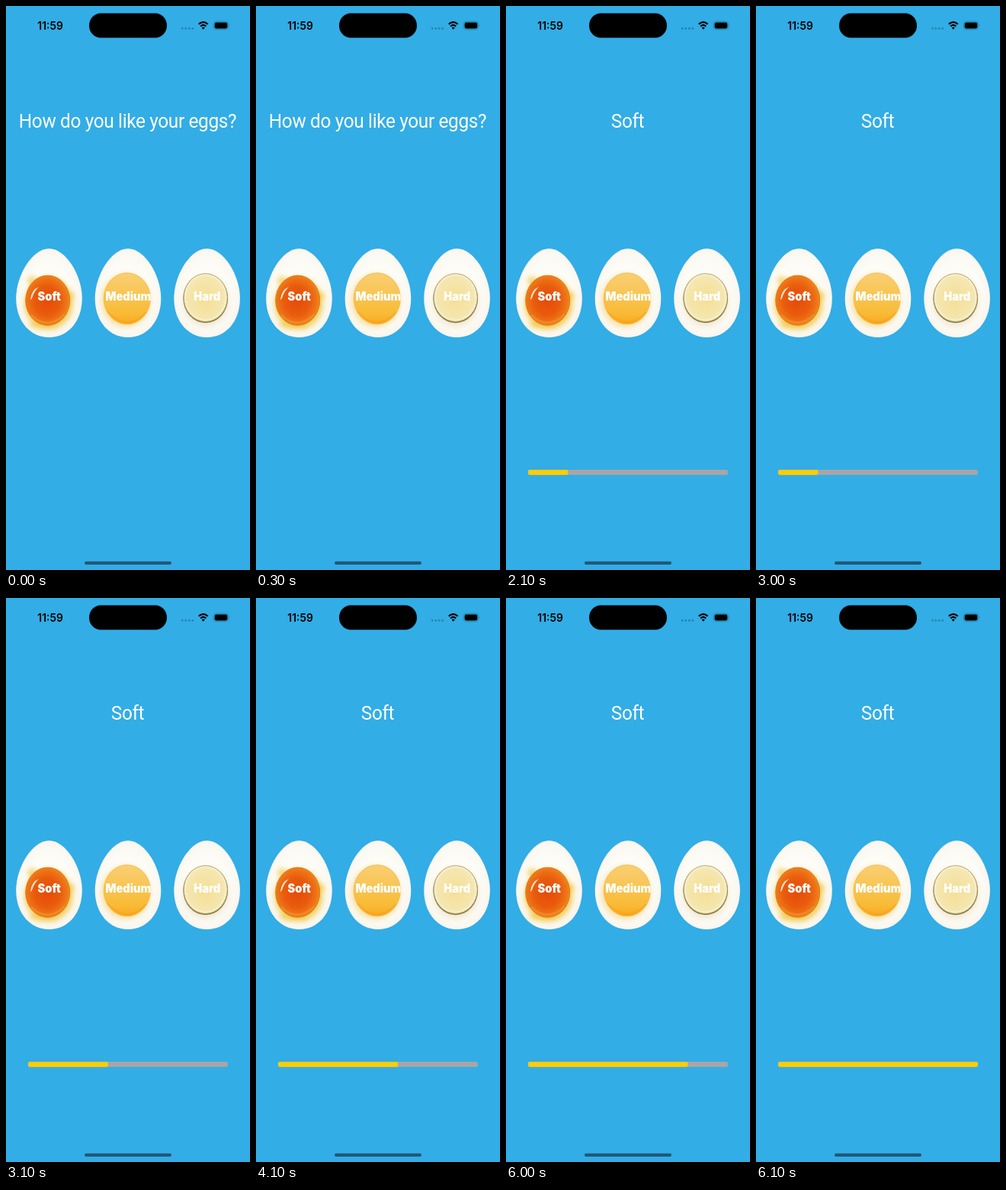
An HTML page that plays this animation: 320 by 737 pixels, repeating every 8 s.

```html
<!DOCTYPE html>
<html lang="en">
<head>
<meta charset="utf-8">
<title>Egg timer</title>
<style>
  html, body { margin: 0; width: 100%; height: 100%; overflow: hidden; background: #32ade6; }
  svg { display: block; width: 320px; height: 737px; }
  text { text-anchor: middle; fill: #fff; }
  #title { font: 30px Roboto, sans-serif; letter-spacing: -.45px; }
  .label { font: 900 18px Inter, sans-serif; letter-spacing: -.05px; }
  #clock { font: 600 17px Inter, sans-serif; fill: #000; }
</style>
</head>
<body>
<svg viewBox="0 0 320 737">
  <defs>
    <radialGradient id="white" cy=".5" r=".54">
      <stop offset=".6" stop-color="#fdfcf6"/>
      <stop offset=".85" stop-color="#faf8f1"/>
      <stop offset="1" stop-color="#f7f4ec"/>
    </radialGradient>
    <radialGradient id="soft" cx=".48" cy=".5" r=".53">
      <stop offset="0" stop-color="#e64a08"/>
      <stop offset=".55" stop-color="#e95b0d"/>
      <stop offset=".85" stop-color="#ee7517"/>
      <stop offset="1" stop-color="#f08c22"/>
    </radialGradient>
    <linearGradient id="medium" x2="0" y2="1">
      <stop offset="0" stop-color="#f9cf74"/>
      <stop offset=".45" stop-color="#f9c450"/>
      <stop offset=".8" stop-color="#f8ba36"/>
      <stop offset="1" stop-color="#f9a71e"/>
    </linearGradient>
    <radialGradient id="hard" cy=".52" r=".54">
      <stop offset="0" stop-color="#f4df96"/>
      <stop offset=".65" stop-color="#f5e5aa"/>
      <stop offset="1" stop-color="#f3e9bd"/>
    </radialGradient>
    <filter id="blur" x="-50%" y="-50%" width="200%" height="200%">
      <feGaussianBlur stdDeviation="3"/>
    </filter>
    <path id="egg" fill="url(#white)"
      d="M0 317C22 317 43.3 352 43.3 382C43.3 413 24 433 0 433S-43.3 413-43.3 382C-43.3 352-22 317 0 317Z"/>
  </defs>

  <rect width="320" height="737" fill="#32ade6"/>

  <!-- status bar -->
  <rect x="109" y="9.5" width="102" height="32" rx="15.1" ry="16"/>
  <path d="M231.2 29.3h13.8" stroke="#2580ab" stroke-width="2.8" stroke-linecap="round" stroke-dasharray="0 4.5"/>
  <g fill="none" stroke="#000" stroke-width="2.2">
    <path d="M252.8 23.8Q258.7 18.3 264.7 23.8M255.2 26.5Q258.7 23.2 262.3 26.5"/>
    <path d="M256.6 28.2Q258.7 26.6 260.9 28.2L258.7 30.8Z" fill="#000" stroke="none"/>
  </g>
  <rect x="272.2" y="20.2" width="19.6" height="10.6" rx="3.4" fill="none" stroke="#2580ab" stroke-width=".9"/>
  <rect x="273.6" y="21.6" width="16.8" height="7.8" rx="2.1"/>
  <path d="M292.8 23.8q1.4 1.7 0 3.4z" fill="#2580ab"/>

  <!-- eggs -->
  <use href="#egg" x="56.5"/>
  <g filter="url(#blur)" fill="#f0c948">
    <ellipse cx="56" cy="389" rx="32" ry="34" opacity=".8"/>
    <circle cx="34" cy="359" r="6" opacity=".7"/>
    <circle cx="84" cy="379" r="6" opacity=".8"/>
    <ellipse cx="48" cy="416" rx="17" ry="6" opacity=".75"/>
  </g>
  <ellipse cx="54.7" cy="384.7" rx="29" ry="32.6" fill="url(#soft)" stroke="#e07a17"/>
  <path d="M32 384Q33 371 43 367Q36 374 34 382Z" fill="#ffe6cf"/>
  <path d="M33 404Q54 424 77 403" fill="none" stroke="#f49a35" stroke-width="2.5" opacity=".5"/>

  <use href="#egg" x="160"/>
  <ellipse cx="157" cy="385" rx="32" ry="35" fill="#f6d680" opacity=".7" filter="url(#blur)"/>
  <ellipse cx="158.8" cy="382.3" rx="30.6" ry="33.5" fill="url(#medium)" stroke="#f5b540" stroke-width=".8"/>
  <path d="M133 399Q158 427 184 400" fill="none" stroke="#fa9f16" stroke-width="1.8" opacity=".6"/>

  <use href="#egg" x="263.6"/>
  <ellipse cx="262" cy="386" rx="30" ry="33" fill="#e9dfbd" opacity=".6" filter="url(#blur)"/>
  <ellipse cx="261.7" cy="382" rx="29.4" ry="32.2" fill="#8c7b4a"/>
  <ellipse cx="261.7" cy="381.1" rx="28.6" ry="31.4" fill="url(#hard)" stroke="#a99a66" stroke-width=".8"/>
  <ellipse cx="261.7" cy="380.9" rx="26.6" ry="29.4" fill="none" stroke="#faf1cf" stroke-width="2" opacity=".7"/>

  <!-- progress -->
  <g id="bar">
    <rect x="29" y="606" width="262" height="6.8" rx="2.4" fill="#aaa5a5"/>
    <rect id="fill" x="29" y="606" height="6.8" rx="2.4" fill="#fc0"/>
  </g>
  <rect x="103" y="725.7" width="114" height="4.3" rx="2.1" fill="#235777"/>

  <!-- text is laid out in points of a 393 x 852 screen -->
  <g transform="scale(.8142 .865)">
    <text id="clock" x="71.3" y="35.8">11:59</text>
    <text id="title" x="195.9" y="183.6"></text>
    <text class="label" x="69.6" y="445">Soft</text>
    <text class="label" x="197" y="445">Medium</text>
    <text class="label" x="324" y="445">Hard</text>
  </g>
</svg>
<script>
  const LOOP = 8000, START = 1100, SECONDS = 5, WIDTH = 262;
  const [title, bar, fill] = ["title", "bar", "fill"].map(id => document.getElementById(id));

  function draw(now) {
    const t = now % LOOP;
    const running = t >= START;
    const ticks = running ? Math.min(SECONDS, Math.floor((t - START) / 1000)) : 0;
    title.textContent = running ? "Soft" : "How do you like your eggs?";
    bar.setAttribute("visibility", running ? "visible" : "hidden");
    fill.setAttribute("width", WIDTH * ticks / SECONDS);
  }

  const start = performance.now();
  function frame() {
    draw(performance.now() - start);
    requestAnimationFrame(frame);
  }
  frame();
</script>
</body>
</html>
```
